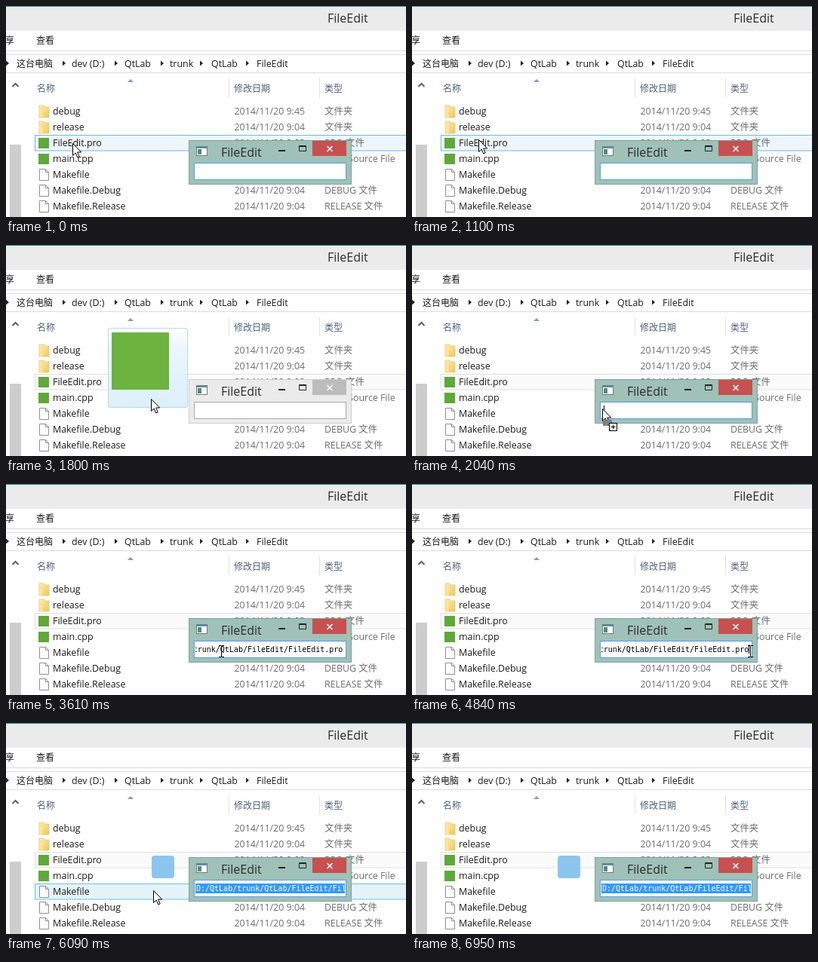
Recreate the animation shown at these times as an HTML page. Size 530x280 px, loop 8.1 s.

```html
<!DOCTYPE html>
<html lang="zh">
<head>
<meta charset="utf-8">
<title>FileEdit</title>
<style>
  html, body { margin: 0; width: 100%; height: 100%; overflow: hidden; background: #fff; }
  svg { display: block; width: 530px; height: 280px; }
  text { font: 12.4px "Open Sans", "Noto Sans CJK SC", "Noto Sans CJK", sans-serif; fill: #1b1b1b; white-space: pre; }
  .cjk { font-size: 12px; }
  .head { font-size: 12px; fill: #4c607a; }
  .meta { fill: #6d6d6d; }
  .title { font-size: 16px; fill: #2b2b2b; }
  .path { font: 10px "DejaVu Sans Mono", monospace; fill: #000; }
  .line { fill: none; stroke: #dadbdc; }
  .rule { fill: none; stroke: #e2e2e2; }
</style>
</head>
<body>
<svg viewBox="0 0 530 280" xmlns="http://www.w3.org/2000/svg">
  <defs>
    <clipPath id="inner"><rect x="251" y="211" width="198" height="19"/></clipPath>
    <linearGradient id="folder" x2="1" y2="1">
      <stop offset="0" stop-color="#fdeeb0"/><stop offset="1" stop-color="#eec75a"/>
    </linearGradient>
    <linearGradient id="glass" x2="0" y2="1">
      <stop offset="0" stop-color="#fff" stop-opacity=".9"/>
      <stop offset=".25" stop-color="#e9f5fc" stop-opacity=".9"/>
      <stop offset="1" stop-color="#d8eefa" stop-opacity=".9"/>
    </linearGradient>
    <pattern id="check" width="2" height="2" patternUnits="userSpaceOnUse">
      <rect width="2" height="2" fill="#fff"/><path d="M0 0h1v1h-1zM1 1h1v1h-1z"/>
    </pattern>
    <path id="pointer" d="M.5 .5V16.5L4.2 13L6.8 19L9.2 18L6.7 12H11.7Z" fill="#fff" stroke="#000"/>
  </defs>

  <!-- file manager -->
  <rect width="530" height="33" fill="#ebebeb"/>
  <rect width="530" height="1" fill="#2a8c90"/>
  <text class="title" x="426" y="22">FileEdit</text>
  <text class="cjk" x="-1" y="50">享</text>
  <text class="cjk" x="40" y="50">查看</text>
  <path class="line" d="M0 59.5H530M0 64.5H530M0 88.5H530"/>
  <g id="crumbs"></g>
  <rect x="5" y="184" width="15" height="96" fill="#cdcdcd"/>
  <path d="M8.5 107L12.5 103L16.5 107" fill="none" stroke="#606060" stroke-width="2"/>
  <path class="rule" d="M295.5 96V121M415.5 96V121"/>
  <path d="M161 101L165 97L169 101Z" fill="#7f9db9"/>
  <text class="head" x="41" y="113.5">名称</text>
  <text class="head" x="302" y="113.5">修改日期</text>
  <text class="head" x="422" y="113.5">类型</text>
  <rect id="focus" x="38.5" y="171.5" width="500" height="20.5"/>
  <rect id="hover" x="38.5" y="213.5" width="500" height="20.5" fill="#e5f3fb" stroke="#70c0e7"/>
  <g id="files"></g>

  <!-- edit window -->
  <rect id="frame" x="242.5" y="178.5" width="215" height="58"/>
  <g>
    <rect x="252.5" y="186.5" width="14" height="12" fill="#fff" stroke="#777"/>
    <rect x="253" y="187" width="13" height="2" fill="#5b8fae"/>
    <rect x="254" y="190" width="5" height="7" fill="#4b8d80"/>
  </g>
  <text class="title" x="285" y="199.5">FileEdit</text>
  <rect x="361" y="191" width="9" height="2" fill="#222"/>
  <path d="M388.5 185.5H397.5V192.5H388.5ZM388 186.5H398" fill="none" stroke="#222"/>
  <rect id="close" x="406" y="179" width="45" height="20"/>
  <path d="M425.5 186L432.5 193M432.5 186L425.5 193" stroke="#fff" stroke-width="1.7"/>
  <rect id="edit" x="249.5" y="208.5" width="201" height="22" fill="#fff"/>
  <g clip-path="url(#inner)">
    <rect id="mark" y="213" height="13" fill="#3399ff"/>
    <text class="path" id="path" y="223"><tspan id="plain"></tspan><tspan id="picked" fill="#fff"></tspan></text>
    <rect id="caret" y="213" width="1" height="12"/>
  </g>

  <rect id="badge" x="193" y="176" width="30" height="30" rx="4" fill="#8cc5ee"/>
  <g id="cursor">
    <g id="ghost">
      <rect x="-56.5" y="-93.5" width="105" height="105" rx="2" fill="url(#glass)" stroke="#b5d9ec"/>
      <rect x="-52" y="-88" width="76" height="76" fill="#6cb33f"/>
    </g>
    <use id="arrow" href="#pointer"/>
    <g id="copy">
      <rect x="1" y="15" width="12" height="8" fill="url(#check)"/>
      <rect x="9.5" y="19.5" width="10" height="10" fill="#fff" stroke="#000"/>
      <path d="M14.5 21.5V27.5M11.5 24.5H17.5" stroke="#000"/>
    </g>
    <path id="beam" d="M-3 -7.5H0L.5 -6.5L1 -7.5H4M.5 -7V7M-3 7.5H0L.5 6.5L1 7.5H4" fill="none" stroke="#000"/>
  </g>
</svg>
<script>
const LOOP = 8100, CHAR = 6;
const PATH = 'D:/QtLab/trunk/QtLab/FileEdit/FileEdit.pro';
const $ = id => document.getElementById(id);
const set = (id, attrs) => { for (const k in attrs) $(id).setAttribute(k, attrs[k]); };
const show = (id, on) => set(id, { visibility: on ? 'visible' : 'hidden' });
const within = (t, a, b) => t >= a && t < b;

// Pointer positions, each held until the next: time, x, y
const moves = [
  [0, 88, 182], [150, 88, 181], [280, 88, 179], [410, 88, 177],
  [1530, 106, 190], [1670, 150, 205], [1800, 192, 204], [1920, 228, 212],
  [2040, 252, 217], [2190, 271, 220], [2340, 283, 221], [2740, 285, 222],
  [3760, 287, 222], [4030, 297, 223], [4160, 325, 224], [4300, 360, 225],
  [4430, 395, 224], [4570, 425, 223], [4710, 442, 222], [4840, 448, 222],
  [5120, 425, 222], [5260, 375, 222], [5400, 315, 222], [5530, 262, 222],
  [5670, 215, 222], [5810, 195, 222], [6250, 196, 225], [6400, 197, 230]
];
const blinks = [[540, 1100], [2040, 2590], [3020, 3610], [4570, 5120]];

const crumbs = [[14, '这台电脑'], [87, 'dev (D:)'], [157, 'QtLab'], [217, 'trunk'], [272, 'QtLab'], [332, 'FileEdit']];
$('crumbs').innerHTML =
  crumbs.map(([x, s], i) => `<text x="${x}" y="80.5"${i ? '' : ' class="cjk"'}>${s}</text>`).join('') +
  [0, 75, 144, 205, 257, 318].map(x => `<path d="M${x} 72.5L${x + 4} 76L${x} 79.5Z" fill="#222"/>`).join('');

const icons = {
  folder: y => `<path d="M44 ${y - 12}h6l1 2h6v14h-13z" fill="url(#folder)" stroke="#e3c266" stroke-width=".7"/>
    <path d="M44.5 ${y - 10}l4 2v13l-4 -2z" fill="#fbe49a"/>`,
  app: y => `<rect x="43" y="${y - 11}" width="14" height="14" fill="#5fa83a"/>`,
  page: y => `<path d="M44.5 ${y - 11.5}h8l4 4v11h-12zM52.5 ${y - 11.5}v4h4" fill="#fff" stroke="#8f8f8f"/>`
};
const files = [
  ['folder', 'debug', '9:45', '文件夹'], ['folder', 'release', '9:04', '文件夹'],
  ['app', 'FileEdit.pro', '9:03', 'PRO 文件'], ['app', 'main.cpp', '9:03', 'C++ Source File'],
  ['page', 'Makefile', '9:04', '文件'], ['page', 'Makefile.Debug', '9:04', 'DEBUG 文件'],
  ['page', 'Makefile.Release', '9:04', 'RELEASE 文件']
];
$('files').innerHTML = files.map(([icon, name, time, type], i) => {
  const y = 144 + 21 * i;
  return icons[icon](y) + `<text x="62" y="${y}">${name}</text>
    <text class="meta" x="302.5" y="${y}">2014/11/20 ${time}</text>
    <text class="meta" x="${type[0] === 'C' ? 428 : 422}" y="${y}">${type}</text>`;
}).join('');

function drawEdit(t, x) {
  const filled = t >= 2590, scrolled = t >= 5670;
  const start = scrolled ? 252 : 445.5 - PATH.length * CHAR;
  const from = t < 5120 ? PATH.length : scrolled ? 0 : Math.round((x - start) / CHAR);
  $('plain').textContent = filled ? PATH.slice(0, from) : '';
  $('picked').textContent = filled ? PATH.slice(from) : '';
  set('path', { x: start });
  const left = scrolled ? 251 : start + from * CHAR;
  const right = Math.min(449, start + PATH.length * CHAR);
  set('mark', { x: left, width: Math.max(0, right - left) });
  show('mark', t >= 5120);
  set('caret', { x: filled ? 446 : 254 });
  show('caret', blinks.some(([a, b]) => within(t, a, b)));
}

function draw(t) {
  const [, x, y] = moves.filter(m => m[0] <= t).pop();
  const active = !within(t, 1530, 2040);
  const copying = within(t, 2040, 2740);
  const beam = within(t, 2740, 5940);

  set('focus', t < 1530 ? { fill: '#edf6fc', stroke: '#70b8e6' } : { fill: '#fbfbfb', stroke: '#dedede' });
  show('hover', within(t, 5940, 6680));
  set('frame', active ? { fill: '#9fc1b7', stroke: '#7f a39a'.replace(' ', '') } : { fill: '#ebebeb', stroke: '#cfcfcf' });
  set('close', { fill: active ? '#c75050' : '#bcbcbc' });
  set('edit', { stroke: active ? '#569de5' : '#ababab' });
  drawEdit(t, x);

  show('badge', t >= 6090);
  set('cursor', { transform: `translate(${x} ${y})` });
  show('ghost', within(t, 1670, 2040));
  show('copy', copying);
  show('beam', beam);
  show('arrow', !beam && t < 6680);
}

function tick() {
  draw(performance.now() % LOOP);
  requestAnimationFrame(tick);
}
tick();
</script>
</body>
</html>
```
